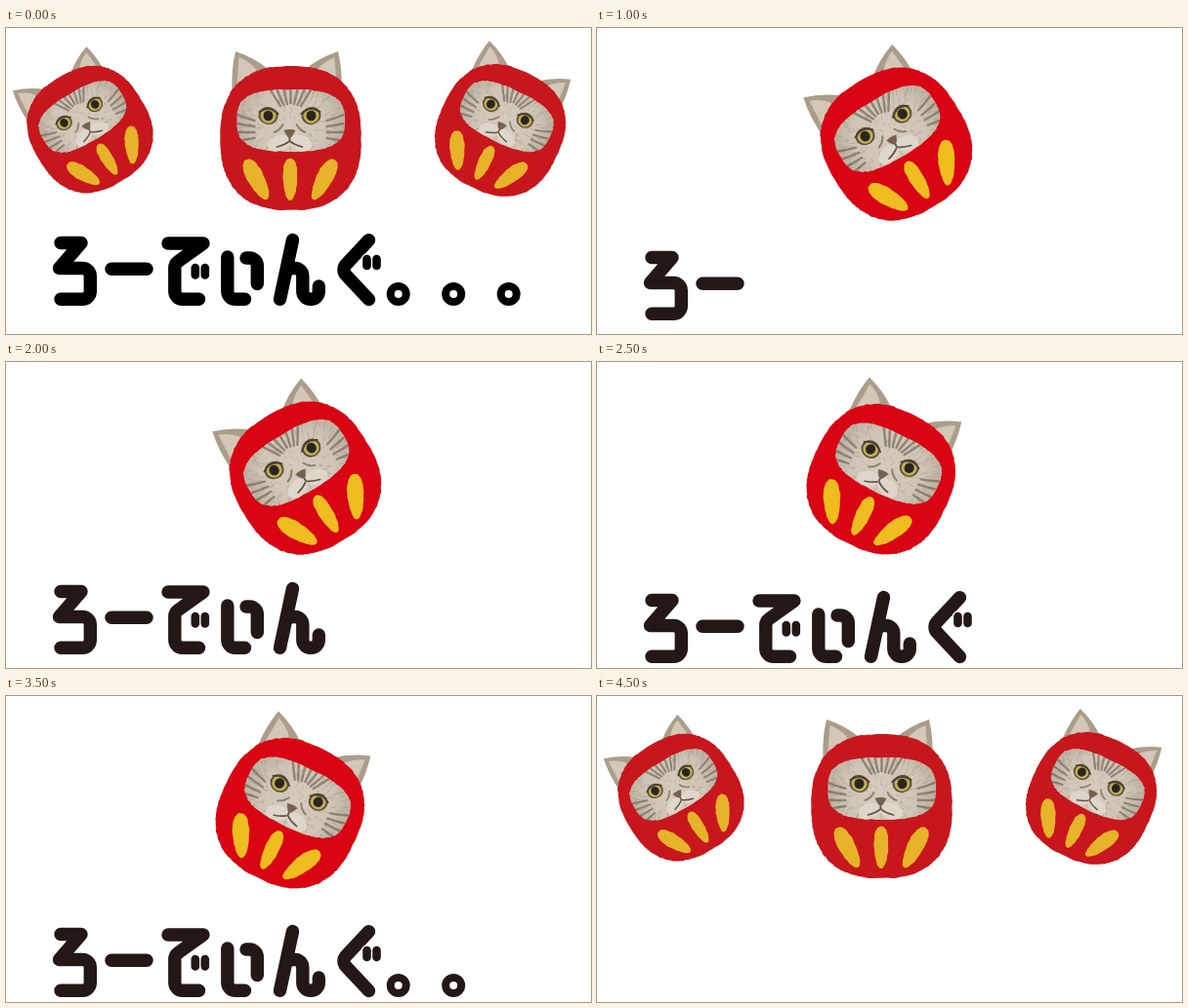
An HTML page with a canvas that plays this animation: 599 px wide and 314 px high, repeating every 5000 ms.

```html
<!DOCTYPE html>
<html lang="ja">
<head>
<meta charset="utf-8">
<title>ろーでぃんぐ</title>
<style>
html, body { margin: 0; width: 100%; height: 100%; overflow: hidden; background: #fff; }
canvas { display: block; width: 599px; height: 314px; }
</style>
</head>
<body>
<canvas id="stage" width="599" height="314" role="img" aria-label="ろーでぃんぐ。。。"></canvas>
<script>
const ctx = document.getElementById('stage').getContext('2d');
const STEP = 500, STEPS = 10;
const TAU = Math.PI * 2, RAD = Math.PI / 180;

let seed = 7;
const rnd = () => (seed = (seed * 16807) % 2147483647) / 2147483647;

function fill(path, color) {
  ctx.fillStyle = color;
  ctx.fill(path);
}

function line(path, color, width) {
  ctx.strokeStyle = color;
  ctx.lineWidth = width;
  ctx.stroke(path);
}

function oval(x, y, rx, ry, color, tilt = 0) {
  const p = new Path2D();
  p.ellipse(x, y, rx, ry, tilt, 0, TAU);
  fill(p, color);
}

// Superellipse with a slightly rough edge; taper narrows the lower end.
function blob(x, y, rx, ry, power, { tilt = 0, taper = 0 } = {}) {
  const path = new Path2D(), count = Math.round((rx + ry) * 1.2);
  const bend = v => Math.sign(v) * Math.abs(v) ** (2 / power);
  const cos = Math.cos(tilt), sin = Math.sin(tilt);
  for (let i = 0; i < count; i++) {
    const a = i / count * TAU, v = bend(Math.sin(a));
    const px = rx * bend(Math.cos(a)) * (1 - taper * v) + (rnd() - 0.5) * 0.8;
    const py = ry * v + (rnd() - 0.5) * 0.8;
    path.lineTo(x + px * cos - py * sin, y + px * sin + py * cos);
  }
  path.closePath();
  return path;
}

// Doll, drawn around its own centre.
const body = blob(0, 0, 72.3, 74, 2.45);
const opening = blob(0, -18, 55.5, 32, 2.9);
const pills = [-1, 0, 1].map(i =>
  blob(i * 34.5 - 0.5, 42.5, i ? 8.3 : 7.3, i ? 23 : 21.5, 2.2, { tilt: i * 28 * RAD, taper: 0.2 }));
const ear = new Path2D('M30 -50L18 -70Q32 -82 52.5 -89Q57 -70 56 -50Z');
const earInner = new Path2D('M36 -55L31 -70Q38 -79 49 -83L51 -55Z');

const stripes = new Path2D();
for (let i = -3; i <= 3; i++) {
  stripes.moveTo(i * 7, -50);
  stripes.quadraticCurveTo(i * 5.5, -42, i * 3.5, -36 + Math.abs(i));
}
for (const side of [-1, 1]) {
  for (let i = 0; i < 4; i++) {
    stripes.moveTo(side * 54, -24 + i * 9);
    stripes.quadraticCurveTo(side * 45, -20 + i * 7, side * 37, -18 + i * 6);
  }
}

const fur = new Path2D();
for (let i = 0; i < 220; i++) {
  const x = (rnd() - 0.5) * 108, y = -48 + rnd() * 60, len = 2 + rnd() * 5;
  fur.moveTo(x, y);
  fur.lineTo(x + x / 55 * len, y + (y + 10) / 30 * len);
}

// Runs a drawing twice, mirrored left and right.
function mirrored(draw) {
  for (const side of [-1, 1]) {
    ctx.save();
    ctx.scale(side, 1);
    draw();
    ctx.restore();
  }
}

const brow = new Path2D('M12 -25Q21 -34 31 -27');
const nose = new Path2D('M-6 -8Q0 -10 6 -8L2 -1H-2Z');
const mouth = new Path2D('M0 -2V3Q5 7 13 9');
const muzzleSide = new Path2D('M7 -14Q10 -8 16 -6');

function drawFace() {
  ctx.save();
  ctx.clip(opening);
  const g = ctx.createRadialGradient(0, -10, 6, 0, -16, 58);
  g.addColorStop(0, '#d5cabb');
  g.addColorStop(0.6, '#cfc4b5');
  g.addColorStop(1, '#baae9e');
  fill(opening, g);
  line(fur, 'rgba(112,99,82,.25)', 0.9);
  line(stripes, 'rgba(95,82,68,.55)', 2.4);
  ctx.translate(-1, 0);
  mirrored(() => {
    oval(11, 5, 12, 8, '#ded6ca', 0.3);
    line(muzzleSide, 'rgba(95,82,68,.6)', 2);
    oval(22, -23, 10, 9, '#5b4e3b', -0.2);
    oval(22, -23, 8, 7.6, '#c3ae55', -0.2);
    oval(22, -23, 5, 5.3, '#292620');
    line(brow, '#4b4033', 2);
    line(mouth, '#655546', 1.7);
  });
  fill(nose, '#77604f');
  ctx.restore();
}

function drawDoll({ x, y, deg, size }, { red, yellow }) {
  ctx.save();
  ctx.translate(x, y);
  ctx.rotate(deg * RAD);
  ctx.scale(size, size);
  ctx.save();
  ctx.translate(-4, 0);
  mirrored(() => {
    fill(ear, '#ab9d8a');
    fill(earInner, '#d3c7b7');
  });
  ctx.restore();
  fill(body, red);
  drawFace();
  pills.forEach(p => fill(p, yellow));
  ctx.restore();
}

// Lettering: polylines whose open corners are rounded and sharp turns kept.
function stroke(path, pts) {
  path.moveTo(...pts[0]);
  for (let i = 1; i < pts.length - 1; i++) {
    const [[ax, ay], [bx, by], [cx, cy]] = pts.slice(i - 1, i + 2);
    const open = (bx - ax) * (cx - bx) + (by - ay) * (cy - by) >= 0;
    if (open) path.arcTo(bx, by, cx, cy, 8);
    else path.lineTo(bx, by);
  }
  path.lineTo(...pts.at(-1));
}

function glyph(text, mark) {
  const path = new Path2D();
  for (const part of text.split('/')) {
    stroke(path, part.trim().split(' ').map(p => p.split(',').map(Number)));
  }
  return { path, width: 13.4, mark: mark && new Path2D(mark) };
}

function dot(x) {
  const path = new Path2D();
  path.arc(x, 297, 8, 0, TAU);
  return { path, width: 8 };
}

const glyphs = [
  glyph('56,244.5 77,244.5 54.5,270.5 86.3,270.5 86.3,302.3 56,302.3'),
  glyph('108,271.3 144,271.3'),
  glyph('166,245 202,245 172.8,266 172.8,302.3 197.5,302.3', 'M193.8 270v7.5m10 0v-7.5'),
  glyph('226.8,259 226.8,302.3 244.5,302.3 / 246,260 257.3,260 257.3,286.5'),
  glyph('293.5,241.5 280.5,302.3 287.3,270.5 303.8,270.5 303.8,302.3 320.3,302.3 320.3,289'),
  glyph('371.5,241.7 343,272 371.5,302.5', 'M369.5 261v7m10 0v-7'),
  ...[0, 1, 2].map(i => dot(401.7 + i * 56.5))
];

function drawText(count, dy, color) {
  ctx.save();
  ctx.translate(0, dy);
  for (const { path, width, mark } of glyphs.slice(0, count)) {
    line(path, color, width);
    if (!mark) continue;
    line(mark, '#fff', 11);
    line(mark, color, 8.6);
  }
  ctx.restore();
}

const calm = { red: '#c8161d', yellow: '#e6b32a' };
const bright = { red: '#d90513', yellow: '#f0bd20' };
const trio = [
  { x: 86, y: 104, deg: -31, size: 0.84 },
  { x: 291.5, y: 113, deg: 0, size: 1 },
  { x: 506, y: 105, deg: 25.5, size: 0.88 }
];
const leanRight = { x: 290.7, y: 120.3, deg: 26, size: 1 };
const leanLeft = { x: 306.5, y: 119, deg: -31, size: 1.01 };

function draw(step) {
  ctx.fillStyle = '#fff';
  ctx.fillRect(0, 0, 599, 314);
  ctx.lineCap = ctx.lineJoin = 'round';
  if (step === 0 || step === STEPS - 1) {
    trio.forEach(pose => drawDoll(pose, calm));
    if (step === 0) drawText(glyphs.length, -24, '#000');
    return;
  }
  const right = step % 2 === 1;
  drawDoll(right ? leanRight : leanLeft, bright);
  // The small ぃ arrives together with で.
  drawText(step < 3 ? step : step + 1, right ? 0 : -9, '#231815');
}

const start = performance.now();
function tick() {
  draw(Math.floor((performance.now() - start) / STEP) % STEPS);
  requestAnimationFrame(tick);
}
tick();
</script>
</body>
</html>
```
